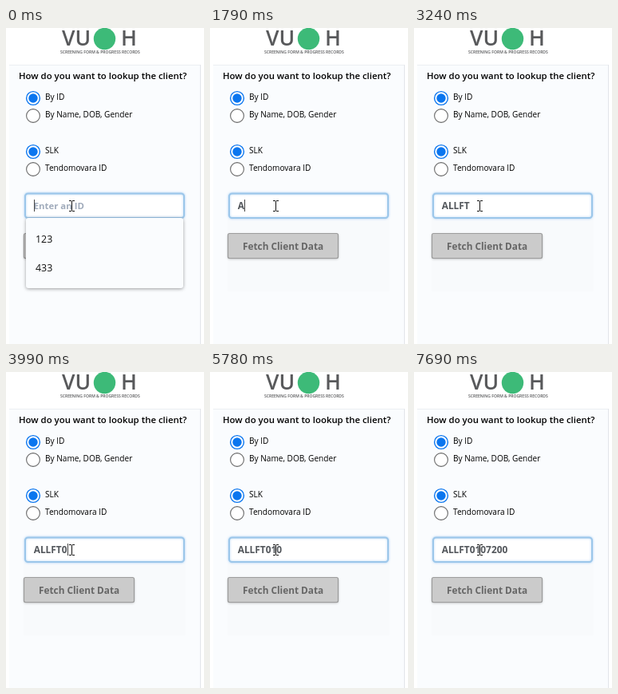
Write an HTML page with a canvas that moves like this. It is 248x396 px and loops after 8 s.

```html
<!DOCTYPE html>
<html lang="en">
<head>
<meta charset="utf-8">
<title>Client lookup</title>
<style>
  html, body { margin: 0; width: 100%; height: 100%; overflow: hidden; background: #fff; }
  canvas { display: block; width: 248px; height: 396px; }
</style>
</head>
<body>
<canvas id="stage"></canvas>
<script>
const W = 248, H = 396, LOOP = 8000;
const FAMILY = '"Open Sans", "Noto Sans", sans-serif';
const PANEL = '#fafcfe';
const VALUE = 'ALLFT0107200';
const INPUT_X = 34.7, INPUT_BASE = 227, INPUT_SIZE = 11.9;

// [start ms, typed characters, caret visible]
const STEPS = [
  [0, 0, 1], [460, 0, 0], [1050, 0, 1], [1490, 0, 0],
  [1790, 1, 1], [2080, 2, 1], [2230, 3, 1], [2530, 4, 1], [2660, 5, 1],
  [3240, 5, 0], [3830, 5, 1], [3990, 6, 1], [4290, 7, 1], [4730, 7, 0],
  [5160, 8, 1], [5780, 8, 0], [5930, 9, 1], [6520, 9, 0],
  [6670, 10, 1], [6950, 11, 1], [7100, 12, 1], [7690, 12, 0]
];
const SPELLCHECK = [3680, 3990];

const canvas = document.getElementById('stage');
const ctx = canvas.getContext('2d');
const scale = window.devicePixelRatio || 1;
canvas.width = W * scale;
canvas.height = H * scale;
ctx.scale(scale, scale);

function text(str, x, y, size, weight, color) {
  ctx.font = `${weight} ${size}px ${FAMILY}`;
  ctx.fillStyle = color;
  ctx.fillText(str, x, y);
}

function rect(x, y, w, h, color) {
  ctx.fillStyle = color;
  ctx.fillRect(x, y, w, h);
}

function paint(fill, stroke, line) {
  ctx.fillStyle = fill;
  ctx.fill();
  if (!stroke) return;
  ctx.strokeStyle = stroke;
  ctx.lineWidth = line;
  ctx.stroke();
}

function box(x, y, w, h, r, fill, stroke, line) {
  ctx.beginPath();
  ctx.roundRect(x, y, w, h, r);
  paint(fill, stroke, line);
}

function disc(x, y, r, fill, stroke, line) {
  ctx.beginPath();
  ctx.arc(x, y, r, 0, Math.PI * 2);
  paint(fill, stroke, line);
}

function withShadow(color, blur, dy, draw) {
  ctx.save();
  ctx.shadowColor = color;
  ctx.shadowBlur = blur * scale;
  ctx.shadowOffsetY = dy * scale;
  draw();
  ctx.restore();
}

function radio(y, label, checked) {
  disc(34, y, 8.4, '#fff', checked ? '#0b76ef' : '#686868', checked ? 1.4 : 1.1);
  if (checked) disc(34, y, 5.7, '#0b76ef');
  text(label, 49, y + 2, 10.1, 500, '#000');
}

function drawHeader() {
  text('VU', 70, 22, 26.5, 600, '#58595b');
  text('H', 144, 22, 26.5, 600, '#58595b');
  disc(123.5, 13.5, 13.7, '#3dba78');
  text('SCREENING FORM & PROGRESS RECORDS', 68, 32, 5.05, 600, '#58595b');
}

function drawPanel() {
  rect(4, 46, 240, H - 46, PANEL);
  rect(4, 46, 240, 1, '#eceff2');
  rect(243, 46, 1, H - 46, '#e2e5e9');
  text('How do you want to lookup the client?', 16, 64, 11.4, 600, '#000');
  radio(88, 'By ID', true);
  radio(110, 'By Name, DOB, Gender', false);
  radio(155, 'SLK', true);
  radio(177, 'Tendomovara ID', false);
}

function drawButton() {
  withShadow('rgba(0,0,0,0.3)', 3, 1, () =>
    box(22.5, 257.5, 138, 31, 2, '#cbcbcb'));
  box(22.5, 257.5, 138, 31, 2, '#cbcbcb', '#9c9c9c', 1.2);
  text('Fetch Client Data', 41, 278, 11.8, 700, '#666');
}

function drawInput() {
  withShadow('rgba(120,180,235,0.55)', 3, 0, () =>
    box(24, 207.5, 199, 30.5, 3.5, '#fff', '#9bc6ea', 2));
}

function drawDropdown() {
  withShadow('rgba(0,0,0,0.38)', 4, 1, () =>
    box(25, 238, 197, 88, 3, PANEL));
  text('123', 37, 269, 12.4, 500, '#111');
  text('433', 37, 305, 12.4, 500, '#111');
}

function drawSquiggle(x0, x1) {
  ctx.beginPath();
  for (let x = x0, i = 0; x <= x1; x += 2, i++) ctx.lineTo(x, i % 2 ? 228.4 : 229.6);
  ctx.strokeStyle = '#e5484d';
  ctx.lineWidth = 0.8;
  ctx.stroke();
}

function drawPointer() {
  rect(82, 217, 1, 12, '#111');
  for (const y of [216, 229]) {
    rect(79, y, 3, 1, '#111');
    rect(83, y, 3, 1, '#111');
  }
}

function draw(time) {
  const t = time % LOOP;
  const [, count, caret] = STEPS.findLast(step => step[0] <= t);
  const typed = VALUE.slice(0, count);

  rect(0, 0, W, H, '#fff');
  drawHeader();
  drawPanel();
  if (count) rect(22, 239, 203, 91, '#f8fafc');
  drawButton();
  drawInput();
  if (!count) drawDropdown();

  if (count) text(typed, INPUT_X, INPUT_BASE, INPUT_SIZE, 700, '#53575c');
  else text('Enter an ID', INPUT_X, INPUT_BASE, 11.4, 700, '#a0abbb');

  ctx.font = `700 ${INPUT_SIZE}px ${FAMILY}`;
  const end = Math.round(INPUT_X + ctx.measureText(typed).width);
  if (t >= SPELLCHECK[0] && t < SPELLCHECK[1]) drawSquiggle(35, 69);
  if (caret) rect(end, 215, 1, 15, '#444');
  drawPointer();
}

const start = performance.now();
function tick() {
  draw(performance.now() - start);
  requestAnimationFrame(tick);
}
tick();
</script>
</body>
</html>
```
